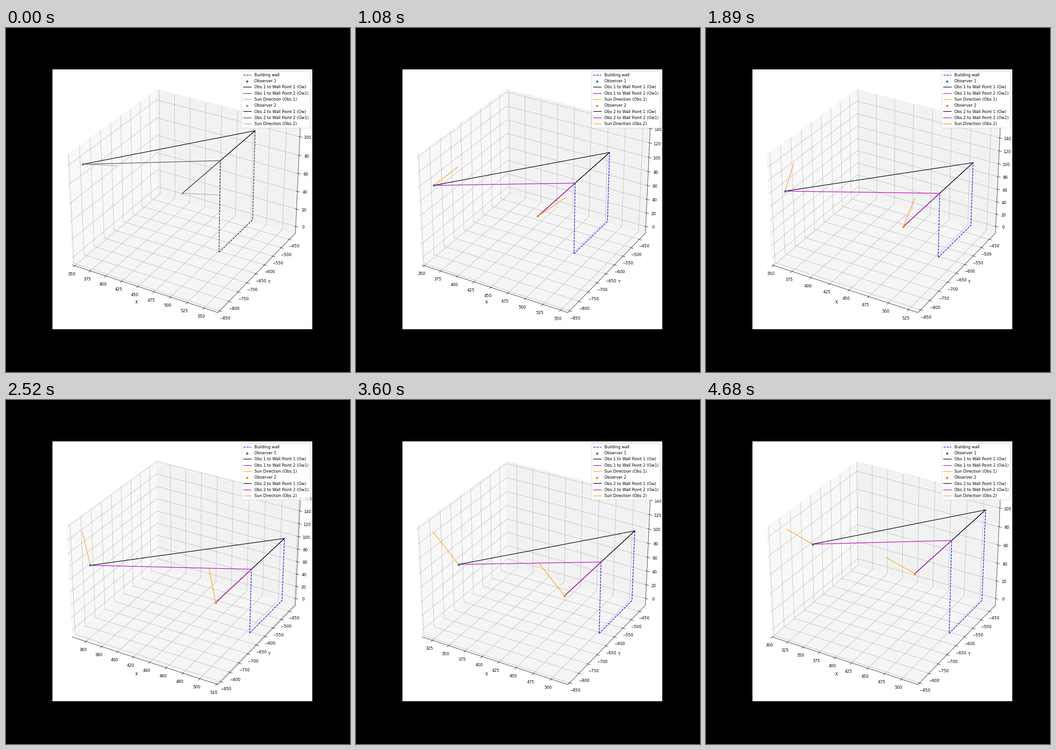
Animation, 748 px wide and 748 px high, one loop 4.77 s. Source, as a matplotlib script:

```python
import numpy as np
import matplotlib.pyplot as plt
from matplotlib.animation import FuncAnimation
from matplotlib.colors import to_rgb
from matplotlib.ticker import FixedLocator, MaxNLocator

SIZE = 748
INCHES = 12
FRAMES = 53
INTERVAL = 90

# Scene geometry
OBSERVERS = np.array([[360, -830, 100], [510, -830, 100]], float)
WALL_X, WALL_FAR, WALL_NEAR, WALL_TOP = 510, -440, -635, 100
FAR_TOP = (WALL_X, WALL_FAR, WALL_TOP)
NEAR_TOP = (WALL_X, WALL_NEAR, WALL_TOP)

# Sun path: a quarter of an hour per frame
LATITUDE = np.radians(29.3)
DECLINATION = np.radians(21.7)
NOON = 25.85
HOUR_STEP = np.radians(3.75)
RAY_LENGTH = 50


def sun_ray(i):
    """East, north and up parts of the ray towards the sun."""
    hour = (i - NOON) * HOUR_STEP
    sl, cl = np.sin(LATITUDE), np.cos(LATITUDE)
    sd, cd = np.sin(DECLINATION), np.cos(DECLINATION)
    east = -cd * np.sin(hour)
    north = sd * cl - cd * sl * np.cos(hour)
    up = sd * sl + cd * cl * np.cos(hour)
    return RAY_LENGTH * np.array([east, north, up])


def gray(color):
    return (float(np.dot(to_rgb(color), (0.299, 0.587, 0.114))),) * 3


plt.rcParams.update({"font.family": "DejaVu Sans", "font.size": 10})
fig = plt.figure(figsize=(INCHES, INCHES), dpi=SIZE / INCHES, facecolor="black")
ax = fig.add_subplot(projection="3d")
fig.subplots_adjust(left=0.125, right=0.9, bottom=0.125, top=0.88)
ax.set_xlabel("X")
ax.set_ylabel("Y")

painted = []


def segment(start, end, color, label):
    line, = ax.plot(*zip(start, end), color=color, label=label)
    painted.append((line, color))
    return line


wall_y = [WALL_NEAR, WALL_FAR, WALL_FAR, WALL_NEAR, WALL_NEAR]
wall_z = [0, 0, WALL_TOP, WALL_TOP, 0]
wall, = ax.plot([WALL_X] * 5, wall_y, wall_z, color="b", linestyle="--",
                label="Building wall")
painted.append((wall, "b"))

sun_lines = []
handles = [wall]
for n, (obs, dot_color) in enumerate(zip(OBSERVERS, ("C0", "C1")), 1):
    dot = ax.scatter(*[[c] for c in obs], color=dot_color, depthshade=False,
                     label=f"Observer {n}")
    painted.append((dot, dot_color))
    far = segment(obs, FAR_TOP, "k", f"Obs {n} to Wall Point 1 (Ow)")
    near = segment(obs, NEAR_TOP, "m", f"Obs {n} to Wall Point 2 (Ow1)")
    sun = segment(obs, obs, "orange", f"Sun Direction (Obs {n})")
    sun_lines.append(sun)
    handles += [dot, far, near, sun]

corners = np.array([FAR_TOP, NEAR_TOP, (WALL_X, WALL_NEAR, 0)], float)
locator = MaxNLocator(nbins=9, steps=[1, 2, 2.5, 5, 10])


def fit_axis(axis, set_lim, values):
    """Pad the data range by 5 %, then the box a little further."""
    low, high = values.min(), values.max()
    pad = 0.05 * (high - low)
    low, high = low - pad, high + pad
    extra = (high - low) / 48
    ticks = locator.tick_values(low, high)
    low, high = low - extra, high + extra
    set_lim(low, high)
    axis.set_major_locator(FixedLocator(ticks[(ticks >= low) & (ticks <= high)]))


def update(i):
    ends = OBSERVERS + sun_ray(i)
    for line, start, end in zip(sun_lines, OBSERVERS, ends):
        line.set_data_3d(*np.array([start, end]).T)

    points = np.vstack([corners, OBSERVERS, ends])
    fit_axis(ax.xaxis, ax.set_xlim, points[:, 0])
    fit_axis(ax.yaxis, ax.set_ylim, points[:, 1])
    fit_axis(ax.zaxis, ax.set_zlim, points[:, 2])

    # The loop opens on a single colourless picture
    for artist, color in painted:
        artist.set_color(gray(color) if i == 0 else to_rgb(color))
    ax.legend(handles=handles, loc="upper right")
    return []


anim = FuncAnimation(fig, update, frames=FRAMES, interval=INTERVAL,
                     repeat=True, repeat_delay=0, blit=False)
plt.show()
```
